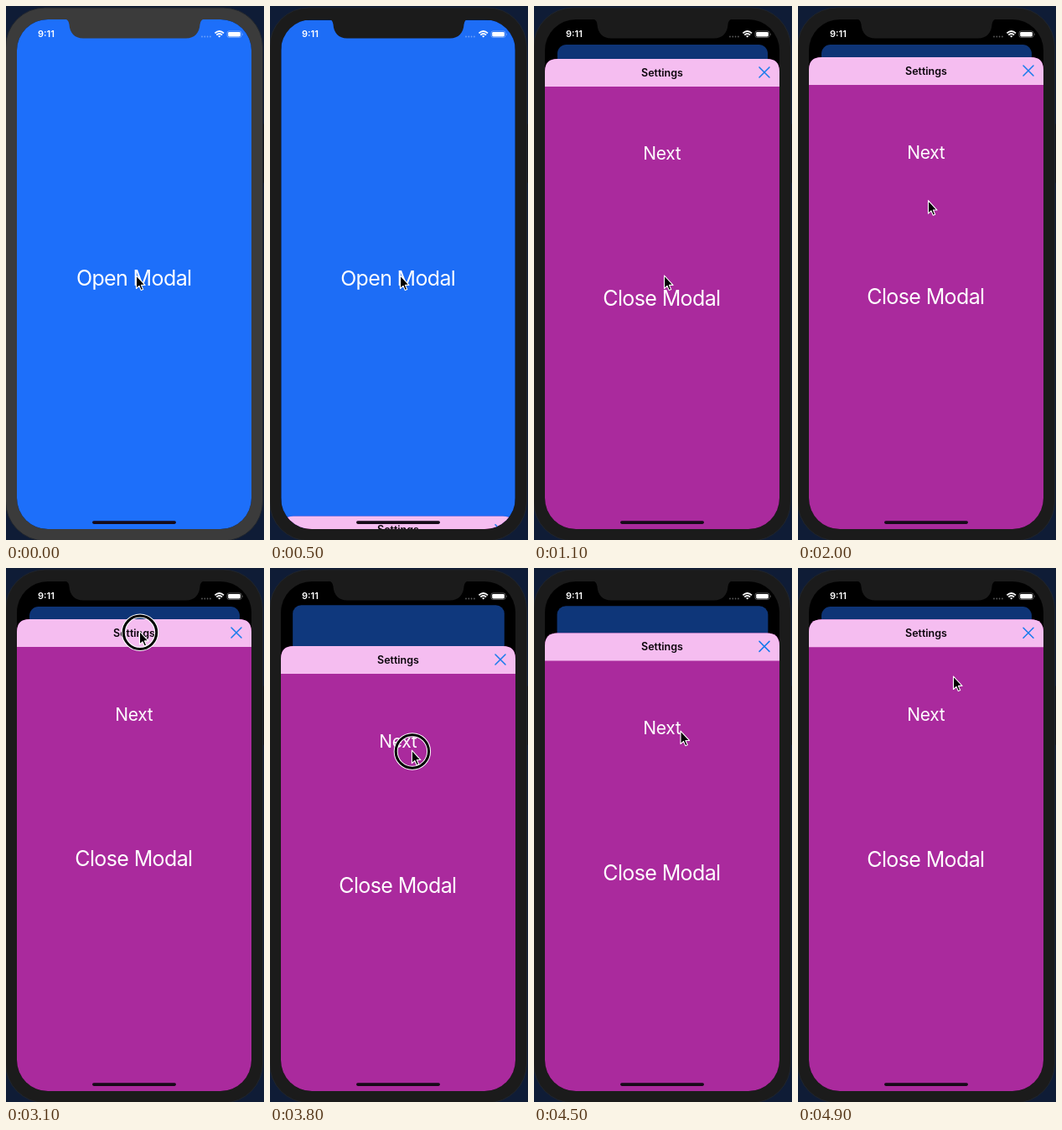
These frames come from a looping animation (308x636 px, 5 s). An HTML page:

```html
<!DOCTYPE html>
<html lang="en">
<head>
<meta charset="utf-8">
<title>Modal sheet</title>
<style>
  html, body { margin: 0; width: 100%; height: 100%; overflow: hidden; background: #0f1c36; }
  svg { display: block; width: 308px; height: 636px; }
  text { font-family: Inter, Roboto, "Liberation Sans", sans-serif; fill: #fff; text-anchor: middle; }
  .big { font-size: 25px; letter-spacing: -.62px; }
  .mid { font-size: 21px; letter-spacing: -.35px; }
  .title { font-size: 12.5px; font-weight: 600; fill: #0c060c; }
  .clock { font-size: 11px; font-weight: 600; }
</style>
</head>
<body>
<svg viewBox="0 0 308 636">
  <defs>
    <clipPath id="glass"><rect x="13" y="16" width="280" height="607" rx="37"/></clipPath>
  </defs>

  <rect x="304" y="140" width="4" height="71" rx="1.5" fill="#11131a"/>
  <rect id="bezel" x="-.5" y="2" width="307" height="635" rx="47" stroke="#20252d"/>

  <g clip-path="url(#glass)">
    <rect x="13" y="16" width="280" height="607"/>
    <g id="card">
      <rect id="cardFill" width="280" height="607"/>
      <text id="openText" class="big" x="139.7" y="317">Open Modal</text>
    </g>
    <g id="sheet">
      <path d="M13 580V15Q13 0 28 0H278Q293 0 293 15V580Z" fill="#aa2a9d"/>
      <path d="M13 33V15Q13 0 28 0H278Q293 0 293 15V33Z" fill="#f5bdf0"/>
      <text class="title" x="153" y="20.7">Settings</text>
      <path d="M269 10l12 12m0-12l-12 12" stroke="#177bec" stroke-width="1.5" stroke-linecap="round"/>
      <text class="mid" x="152.8" y="120.5">Next</text>
      <text class="big" x="152.4" y="294.4">Close Modal</text>
    </g>
    <rect x="103" y="613.3" width="100" height="3.6" rx="1.8" fill="#160a18"/>
  </g>

  <path id="notch" d="M69 15Q75 16 75.5 22C76 32 82 38.5 92 38.5H215C225 38.5 231 32 231.5 22Q232 16 238 15Z"/>

  <text class="clock" x="48" y="37.4">9:11</text>
  <path d="M234 36.5h10" stroke="#fff" stroke-width="1.8" stroke-linecap="round"
    stroke-dasharray="0 3.3" opacity=".35"/>
  <g fill="none" stroke="#fff" stroke-width="1.7">
    <path d="M249.4 32.4Q254.7 27.6 260 32.4"/>
    <path d="M251.3 34.5Q254.7 31.5 258.1 34.5"/>
  </g>
  <path d="M252.9 35.8Q254.7 34.5 256.5 35.8L254.7 37.6Z" fill="#fff"/>
  <rect x="264" y="29.9" width="17" height="7.6" rx="2.3" fill="none" stroke="#fff" stroke-opacity=".4" stroke-width=".8"/>
  <rect x="265.2" y="31" width="14.6" height="5.4" rx="1.3" fill="#fff"/>
  <path d="M282.2 32.2q1.3 1.5 0 3z" fill="#fff" opacity=".5"/>

  <g id="pointer">
    <g id="ring" fill="none">
      <circle cx="1" cy="1.3" r="19.7" stroke="#fff" stroke-width="5"/>
      <circle cx="1" cy="1.3" r="19.7" stroke="#000" stroke-width="3"/>
    </g>
    <path d="M.5 0V15.5L4 12.3L6.3 17.6L8.7 16.6L6.4 11.4H11Z"
      fill="#000" stroke="#fff" stroke-width="1.1" stroke-linejoin="round"/>
  </g>
</svg>

<script>
  const LOOP = 5000, STEP = 100;
  const TOP = 61, TRAVEL = 562, PULL = 92;
  const OPEN = 480, GRAB = 3000, DRAG = 3500, RELEASE = 4260;
  const $ = id => document.getElementById(id);

  // Where the pointer rests or turns
  const stops = [
    { t: 1740, x: 155, y: 321 },
    { t: 2350, x: 155, y: 92 },
    { t: 2550, x: 203, y: 84 },
    { t: 2780, x: 159, y: 75.5 },
    { t: 3100, x: 159, y: 75.5 },
    { t: 3850, x: 169, y: 219 },
    { t: 4300, x: 170, y: 222 },
    { t: 4850, x: 185, y: 129 }
  ];

  const clamp = u => Math.min(1, Math.max(0, u));
  const smooth = u => u * u * (3 - 2 * u);

  function pointerAt(t) {
    const next = stops.findIndex(s => s.t > t);
    const b = stops.at(next), a = stops[Math.max(0, next < 0 ? stops.length - 1 : next - 1)];
    const k = a === b ? 0 : smooth(clamp((t - a.t) / (b.t - a.t)));
    return [a.x + (b.x - a.x) * k, a.y + (b.y - a.y) * k];
  }

  // Remaining distance of a critically damped spring, from 1 to 0
  function spring(ms, rate) {
    const u = Math.max(0, ms) / 1000 * rate;
    return (1 + u) * Math.exp(-u);
  }

  // The sheet springs open, trails the drag, then springs back
  function sheetTop(t) {
    const pulled = PULL * (1 - spring(Math.min(t, RELEASE) - DRAG, 4.1));
    return TOP + TRAVEL * spring(t - OPEN, 12.68) + pulled * spring(t - RELEASE, 12);
  }

  const rgb = (...c) => `rgb(${c.map(Math.round)})`;
  const move = (id, x, y, s = 1) =>
    $(id).setAttribute("transform", `translate(${x} ${y}) scale(${s})`);

  function draw(t) {
    const y = sheetTop(t), p = 1 - (y - TOP) / TRAVEL;
    const light = 1 - .53 * p;
    move("sheet", 0, y);
    move("card", 13 + 15 * p, 16 + 30 * p, 1 - .1036 * p);
    $("cardFill").setAttribute("rx", 12 * p);
    $("cardFill").setAttribute("fill", rgb(29 * light, 111 * light, 250 * light));
    $("openText").setAttribute("opacity", light);

    const grey = 27 + 32 * clamp(1 - t / 300) ** 2;
    for (const id of ["bezel", "notch"]) $(id).setAttribute("fill", rgb(grey, grey, grey));

    move("pointer", ...pointerAt(t));
    const down = (t >= 200 && t < 500) || (t >= GRAB && t < RELEASE);
    $("ring").setAttribute("visibility", down ? "visible" : "hidden");
  }

  function tick() {
    draw(Math.floor((performance.now() + 10) / STEP) * STEP % LOOP);
    requestAnimationFrame(tick);
  }
  tick();
</script>
</body>
</html>
```
